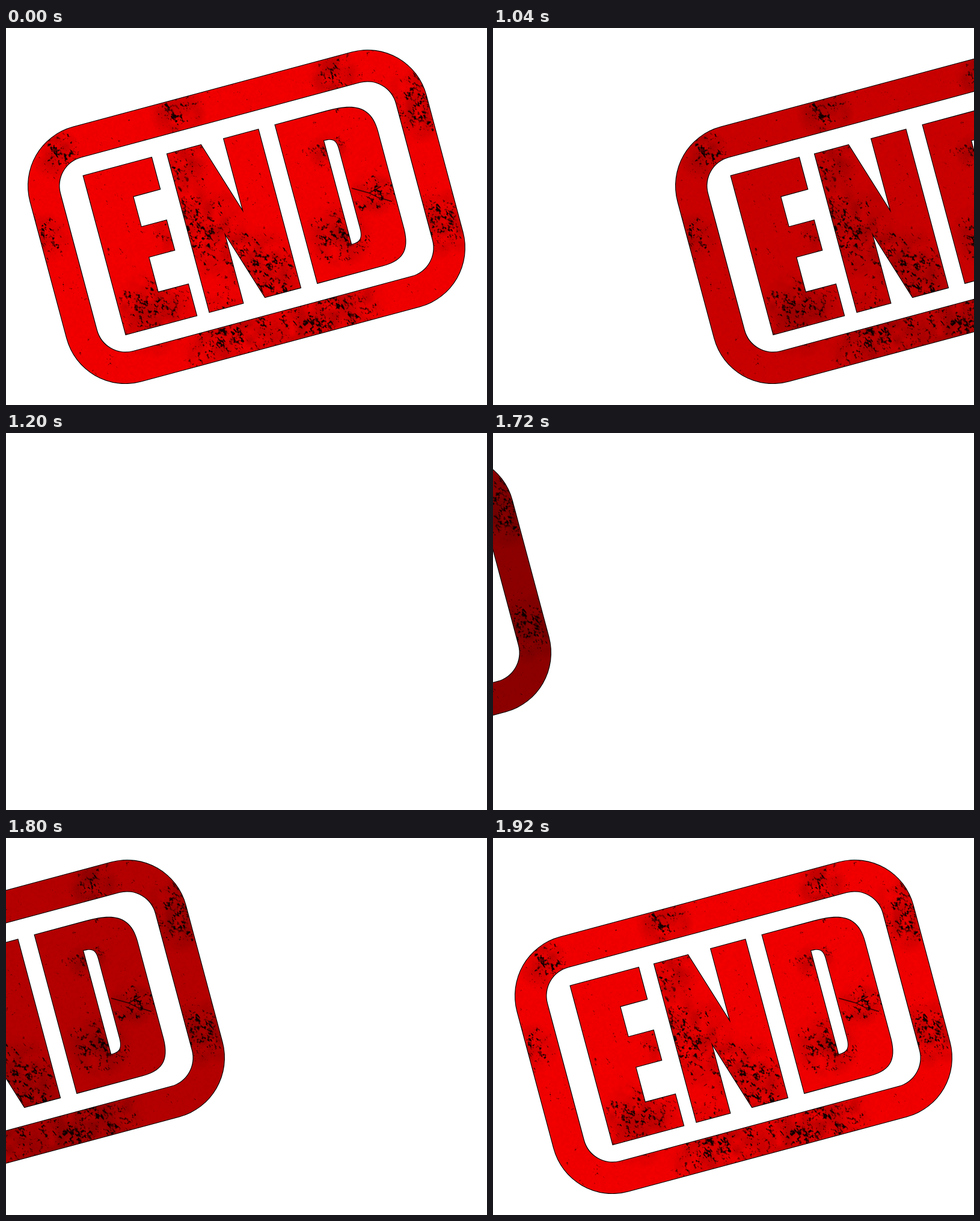
Recreate the animation shown at these times as an HTML page with a canvas. Size 800 by 626 pixels, loop 1960 ms.

```html
<!DOCTYPE html>
<html lang="en">
<head>
<meta charset="utf-8">
<title>End stamp</title>
<style>
  html, body { margin: 0; width: 100%; height: 100%; overflow: hidden; background: #fff; }
  canvas { display: block; }
</style>
</head>
<body>
<canvas id="stage" width="800" height="626" role="img" aria-label="END"></canvas>
<script>
const start = performance.now();
const W = 800, H = 626, LOOP = 1960, TICK = 40;
const ctx = document.getElementById('stage').getContext('2d');

// Letters are upright around the stamp's centre; the whole stamp is tilted later.
const LETTERS = {
  E: 'M-245.5-137H-126V-80.5H-172.5V-30H-129V23.5H-173.5V82H-121.5V138H-245.5Z',
  N: 'M-101.5-136H-41.5L-4-15V-136H57.5V138H-5.5L-41.5 22.5V138H-101.5Z',
  D: 'M84.5-136H174C217-136 248.5-128 248.5-80V80C249.5 120 237 138 198 138H84.5Z' +
     'M157.5-88.5C171-88.5 177-85 177-70V66C177 84 172 89 157.5 89Z'
};
const CRACK = 'M575 266L604 274L618 281L642 288M604 274L624 263';

// Centres and radii of the most worn places
const PATCHES = [
  [285, 138, 50], [545, 78, 45], [686, 128, 65], [85, 212, 45],
  [65, 350, 45], [370, 520, 85], [480, 490, 70], [570, 465, 65],
  [728, 325, 60], [240, 475, 75], [325, 335, 85], [425, 400, 75],
  [555, 340, 60], [610, 275, 40], [300, 225, 45], [535, 205, 35]
];

const clamp = v => Math.max(0, Math.min(1, v));

function hash(x, y) {
  let h = Math.imul(x, 374761393) + Math.imul(y, 668265263);
  h = Math.imul(h ^ (h >>> 13), 1274126177);
  return ((h ^ (h >>> 16)) >>> 0) / 4294967296;
}

function noise(x, y) {
  const ix = Math.floor(x), iy = Math.floor(y);
  let u = x - ix, v = y - iy;
  u *= u * (3 - 2 * u);
  v *= v * (3 - 2 * v);
  const a = hash(ix, iy), b = hash(ix + 1, iy);
  const c = hash(ix, iy + 1), d = hash(ix + 1, iy + 1);
  return a + (b - a) * u + (c - a + (a - b - c + d) * u) * v;
}

function wear(x, y) {
  let sum = 0;
  for (const [px, py, r] of PATCHES) {
    sum += Math.max(0, 1 - ((x - px) ** 2 + (y - py) ** 2) / r ** 2);
  }
  return Math.min(1, sum);
}

function stampPath() {
  const flat = new Path2D();
  for (const inset of [0, 53.5]) {
    const w = 341.8 - inset, h = 219.5 - inset;
    flat.roundRect(-w, -h, 2 * w, 2 * h, 102 - inset);
  }
  for (const d of Object.values(LETTERS)) flat.addPath(new Path2D(d));
  const path = new Path2D();
  path.addPath(flat, new DOMMatrix().translate(400, 313.5).rotate(-15));
  return path;
}

function paintTexture(g) {
  const img = g.createImageData(W, H);
  const cos = Math.cos(.9), sin = Math.sin(.9);
  for (let y = 0, i = 0; y < H; y++) {
    for (let x = 0; x < W; x++, i += 4) {
      const u = (x * cos + y * sin) / 1.4, v = y * cos - x * sin;
      const w = wear(x, y);
      const n = .45 * noise(u / 2, v / 2) + .35 * noise(u / 5 + 50, v / 5) +
                .2 * noise(u / 16, v / 16 + 90);
      const dark = clamp((n - .76 + .24 * w) * 5);
      const tone = 244 - 10 * noise(x / 3, y / 3) - 60 * w * noise(x / 14, y / 14);
      img.data[i] = tone * (1 - .9 * dark);
      img.data[i + 3] = 255;
    }
  }
  g.putImageData(img, 0, 0);
  g.strokeStyle = 'rgba(20,0,0,.8)';
  g.lineWidth = 1.5;
  g.stroke(new Path2D(CRACK));
}

function makeStamp() {
  const c = document.createElement('canvas');
  c.width = W;
  c.height = H;
  const g = c.getContext('2d');
  const path = stampPath();
  paintTexture(g);
  g.globalCompositeOperation = 'destination-in';
  g.fill(path, 'evenodd');
  // Keep the outline inside the shape
  g.globalCompositeOperation = 'source-atop';
  g.strokeStyle = '#000';
  g.lineWidth = 2.2;
  g.stroke(path);
  return c;
}

// Sixths of the stage width the stamp has slid; negative is off to the left.
function slide(t) {
  if (t < 1000 || t >= 1920) return 0;
  if (t < 1200) return Math.floor((t - 1000) / TICK) + 1;
  if (t < 1720) return 6;
  return Math.floor((t - 1720) / TICK) - 5;
}

const stamp = makeStamp();

function draw() {
  const step = slide((performance.now() - start) % LOOP);
  ctx.globalCompositeOperation = 'source-over';
  ctx.clearRect(0, 0, W, H);
  ctx.drawImage(stamp, Math.round(step * W / 6), 0);
  ctx.globalCompositeOperation = 'source-atop';
  ctx.fillStyle = `rgba(0,0,0,${Math.abs(step) / 12})`;
  ctx.fillRect(0, 0, W, H);
  requestAnimationFrame(draw);
}
draw();
</script>
</body>
</html>
```
